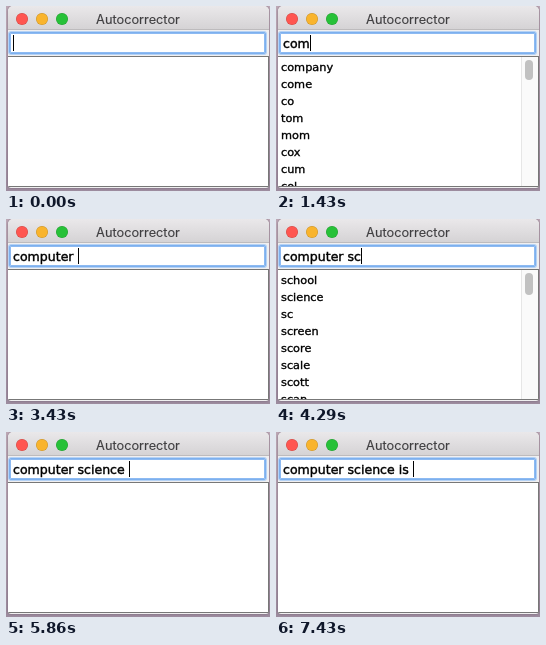
Recreate the animation shown at these times as an HTML page. Size 264 by 185 pixels, loop 8000 ms.

```html
<!DOCTYPE html>
<html lang="en">
<head>
<meta charset="utf-8">
<title>Autocorrector</title>
<style>
html, body { margin: 0; width: 100%; height: 100%; overflow: hidden; }
body { position: relative; background: linear-gradient(#bda9b6, #ad9bab 60%, #9c8b9e); }
div { position: absolute; box-sizing: border-box; }
#window { left: 2px; top: 0; width: 261px; height: 182px; border-radius: 5px 5px 3px 3px;
  background: #f0eff0; overflow: hidden; box-shadow: 0 0 2px #6c5a6c; }
#bar { left: 0; top: 0; width: 261px; height: 24px; border-bottom: 1px solid #bdbbbd;
  background: linear-gradient(#eae8ea, #d5d3d5); }
#title { left: -1px; top: 5px; width: 262px; text-align: center; color: #3f3e40;
  font: 12.75px/18px Inter, sans-serif; -webkit-text-stroke: .15px #3f3e40; }
.light { top: 7px; width: 12px; height: 12px; border-radius: 50%; box-shadow: inset 0 0 0 .5px #0003; }
#field { left: 1px; top: 26px; width: 257px; height: 22px; background: #fff;
  border: 1px solid #7db0ee; border-radius: 2px;
  box-shadow: 0 0 0 1px #b5d2f5, inset 0 0 0 1px #8dbaf2; }
#entry { left: 5px; top: 29px; height: 17px; white-space: pre; color: #000;
  font: 12.55px/17px "DejaVu Sans", sans-serif; -webkit-text-stroke: .4px #000; }
#caret { position: absolute; left: 100%; top: 0; width: 1px; height: 16px; background: #000; }
#list { left: 0; top: 50px; width: 261px; height: 131px; background: #fff; overflow: hidden;
  border: 1px solid #777; border-width: 1px 1px 1px 0; }
#words { left: 3px; top: 2px; white-space: pre; color: #000;
  font: 11.3px/17px "DejaVu Sans", sans-serif; -webkit-text-stroke: .35px #000; }
#track { right: 0; top: 0; width: 17px; height: 130px; background: #fafafa; border-left: 1px solid #e6e6e6; }
#thumb { left: 3px; top: 3px; width: 8px; border-radius: 4px; background: #c1c1c1; }
</style>
</head>
<body>
<div id="window">
  <div id="bar"></div>
  <div class="light" style="left:8px;background:#ff5650"></div>
  <div class="light" style="left:28px;background:#f9b42d"></div>
  <div class="light" style="left:48px;background:#27c138"></div>
  <div id="title">Autocorrector</div>
  <div id="field"></div>
  <div id="entry"><span id="text"></span><span id="caret"></span></div>
  <div id="list">
    <div id="words"></div>
    <div id="track"><div id="thumb"></div></div>
  </div>
</div>
<script>
const LOOP = 8000;
// time, typed text, suggestions, scroll thumb height (0: list fits)
const steps = [
  [0, "", "", 0],
  [710, "c", "can c contact click copyright city could center", 18],
  [1140, "co", "contact copyright could company co code come complete", 18],
  [1430, "com", "company come co tom mom cox cum col", 20],
  [1710, "comp", "company computer complete comp camp come coop romp", 60],
  [2000, "compu", "computer compute campus", 0],
  [2290, "comput", "computer compute", 0],
  [2710, "compute", "computer compute compete commute compute comp", 0],
  [3000, "computer", "computer compute commuter computed compete", 0],
  [3430, "computer ", "", 0],
  [3860, "computer s", "search site see so service some should she", 18],
  [4290, "computer sc", "school science sc screen score scale scott scan", 22],
  [4710, "computer sci", "science sci scio ski sic sir", 0],
  [4860, "computer scie", "science sci scio saie cie sie", 0],
  [5000, "computer scien", "science scion", 0],
  [5290, "computer scienc", "science", 0],
  [5570, "computer science", "science silence", 0],
  [5860, "computer science ", "", 0],
  [6140, "computer science i", "in is i it if information into its", 18],
  [6290, "computer science is", "is in it as its his us issue", 20],
  [6430, "computer science is ", "", 0]
];
const caretOff = [[430, 710], [6860, 7430]];
const $ = id => document.getElementById(id);
let shown;

function draw(now) {
  const t = now % LOOP;
  const step = steps.findLast(s => s[0] <= t);
  if (step !== shown) {
    const [, text, words, thumb] = shown = step;
    $("text").textContent = text;
    $("words").textContent = words.replaceAll(" ", "\n");
    $("track").hidden = !thumb;
    $("thumb").style.height = thumb + "px";
  }
  $("caret").hidden = caretOff.some(([from, to]) => t >= from && t < to);
  requestAnimationFrame(() => draw(performance.now()));
}
draw(performance.now());
</script>
</body>
</html>
```
